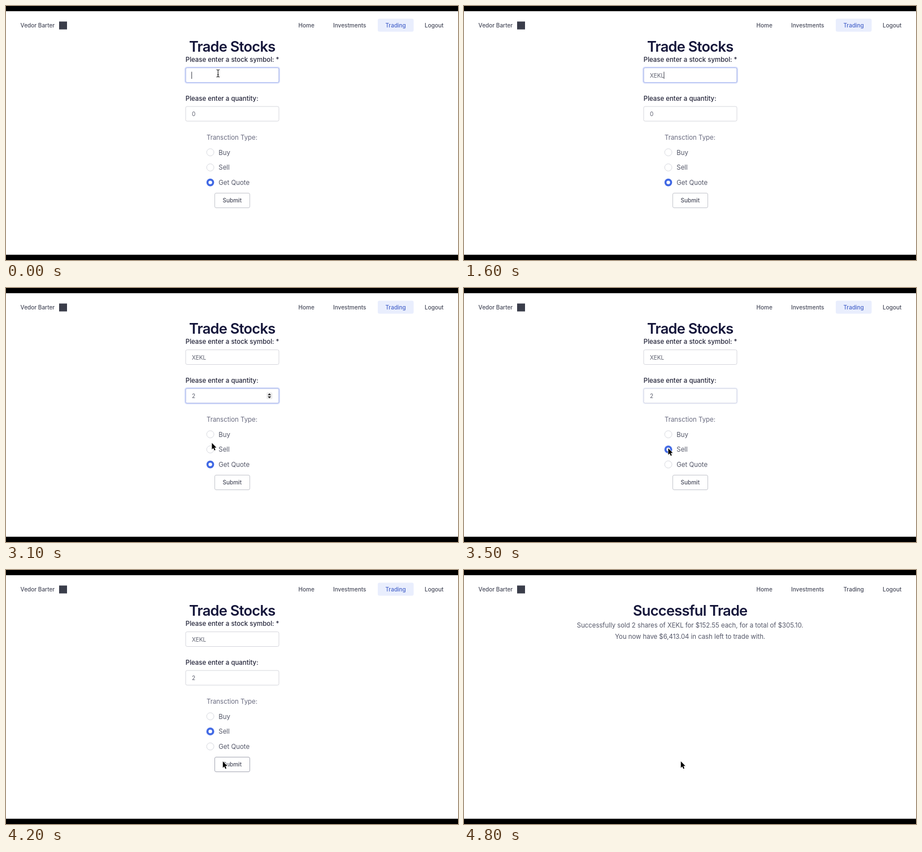
Recreate the animation shown at these times as an HTML page. Size 800 by 450 pixels, loop 5.03 s.

```html
<!DOCTYPE html>
<html lang="en">
<head>
<meta charset="utf-8">
<title>Stock trade form</title>
<style>
  html, body { margin: 0; width: 100%; height: 100%; overflow: hidden; background: #fff; }
  svg { display: block; width: 100vw; height: 100vh; }
  text { font: 400 11.45px Inter, "Open Sans", sans-serif; fill: #555869; white-space: pre; }
  .nav { font-size: 10.03px; font-weight: 500; fill: #494c5c; }
  .title { font-size: 25.5px; font-weight: 600; letter-spacing: -.03em; fill: #15163a; }
  .label { font-weight: 500; fill: #25263b; }
  .legend { fill: #6a6c80; }
  .value { font-size: 10.03px; fill: #5b5e6d; }
  .para { letter-spacing: -.005em; }
  .mid { text-anchor: middle; }
  .box { fill: #fff; stroke: #d6d7dd; }
  .ring { fill: none; stroke: #d9e0fb; stroke-width: 2; }
  .edge { fill: none; stroke: #a7b6ef; }
</style>
</head>
<body>
<svg viewBox="0 0 800 450" preserveAspectRatio="none">
  <rect width="800" height="450" fill="#fff"/>
  <rect id="pill" x="658" y="22.5" width="63.5" height="23" rx="3" fill="#e9eefd"/>
  <text class="nav" x="25.6" y="37.7">Vedor Barter</text>
  <rect x="94" y="27.5" width="14" height="14" fill="#3a3d4a"/>
  <text class="nav" x="517.6" y="37.7">Home</text>
  <text class="nav" x="579" y="37.7">Investments</text>
  <text class="nav" id="trading" x="671.4" y="37.7">Trading</text>
  <text class="nav" x="741.1" y="37.7">Logout</text>

  <g id="form">
    <text class="title mid" x="400.2" y="80.7">Trade Stocks</text>
    <text class="label" x="317.8" y="99.2">Please enter a stock symbol: *</text>
    <text class="label" x="317.8" y="167.5">Please enter a quantity:</text>
    <g id="fields"></g>
    <g id="stepper">
      <rect x="461" y="185" width="10.5" height="12" rx="2" fill="#ededee"/>
      <path d="M463.2 189.9h6l-3-3.3zM463.2 192.1h6l-3 3.3z" fill="#333"/>
    </g>
    <rect id="caret" width="1" height="12.5" fill="#3a3c48"/>
    <text class="legend" x="354.9" y="236.8">Transction Type:</text>
    <g id="radios"></g>
    <g id="submit">
      <rect id="button" class="box" x="369.5" y="331.5" width="62" height="26" rx="2.5"/>
      <text class="nav mid" x="400.3" y="347.6">Submit</text>
    </g>
    <g id="loading">
      <rect class="box" x="361.5" y="331.5" width="78" height="26" rx="2.5" style="stroke:#e7e8eb"/>
      <circle id="spin" cx="378.3" cy="344.2" r="5.5" fill="none" stroke="#bfc1c9" stroke-width="1.3" stroke-dasharray="26 8.6"/>
      <text class="nav mid" x="408.6" y="347.6" style="fill:#c2c4cc">Submit</text>
    </g>
  </g>

  <g id="done">
    <text class="title mid" x="400.2" y="80.7">Successful Trade</text>
    <text class="para mid" x="400.2" y="101.8">Successfully sold 2 shares of XEKL for $152.55 each, for a total of $305.10.</text>
    <text class="para mid" x="400.2" y="121.8">You now have $6,413.04 in cash left to trade with.</text>
  </g>

  <path id="beam" d="M-2.8-6.5Q0-6.5 0-5V5Q0 6.5-2.8 6.5M2.8-6.5Q0-6.5 0-5M0 5Q0 6.5 2.8 6.5M-1.5 2.5h3" fill="none" stroke="#222" stroke-width="1.1"/>
  <path id="arrow" d="M0 0V11.4L2.6 9 4.4 13.2 6.3 12.4 4.5 8.3H8Z" fill="#000" stroke="#fff" stroke-width="1.4" paint-order="stroke"/>
  <rect width="800" height="9.2"/>
  <rect y="440.7" width="800" height="9.3"/>
</svg>
<script>
const LOOP = 5030, STEP = 100, CLICK = 3400, SEND = 4500, DONE = 4800;
const $ = id => document.getElementById(id);
const show = (el, on) => { el.style.display = on ? '' : 'none'; };
const clamp = v => Math.max(0, Math.min(1, v));

function add(parent, tag, attrs, text = '') {
  const el = document.createElementNS('http://www.w3.org/2000/svg', tag);
  for (const key in attrs) el.setAttribute(key, attrs[key]);
  el.textContent = text;
  parent.append(el);
  return el;
}

function makeField(y) {
  const box = { x: 318, y, width: 165, height: 26, rx: 2.5 };
  add($('fields'), 'rect', { ...box, class: 'box' });
  const focus = add($('fields'), 'g', {});
  add(focus, 'rect', { x: 316.9, y: y - 1.1, width: 167.2, height: 28.2, rx: 3.5, class: 'ring' });
  add(focus, 'rect', { ...box, class: 'edge' });
  const value = add($('fields'), 'text', { x: 329, y: y + 17.3, class: 'value' });
  return { y, focus, value };
}

function makeRadio(name, y) {
  const halo = add($('radios'), 'circle', { cx: 361.6, cy: y, r: 7.6, fill: '#d5defb' });
  const dot = add($('radios'), 'circle', { cx: 361.6, cy: y, fill: '#fff' });
  add($('radios'), 'text', { x: 376.3, y: y + 4.4 }, name);
  return { y, halo, dot };
}

const symbol = makeField(109.5), quantity = makeField(178);
const radios = [['Buy', 259.2], ['Sell', 286], ['Get Quote', 312.6]].map(r => makeRadio(...r));

// Each row: start time, value
const symbolText = [[0, ''], [800, 'X'], [1100, 'XE'], [1300, 'XEK'], [1400, 'XEKL']];
const quantityText = [[0, '0'], [2200, '2']];
const focusOn = [[0, 'symbol'], [1900, 'quantity'], [CLICK, 'sell'], [SEND, '']];
const caretOn = [[0, 1], [400, 0], [800, 1], [1900, 0], [2200, 1], [2700, 0], [3200, 1], [CLICK, 0]];
const mouseOn = [[0, 1], [800, 0], [2600, 1]];
// Pointer path: time, x, y
const path = [
  [0, 375.3, 119.3], [2600, 375.3, 119.3], [3100, 364.4, 274.5], [3300, 361.5, 284],
  [3700, 361.5, 284], [3800, 352.6, 256.2], [4200, 383.8, 339], [LOOP, 383.8, 339]
];

const at = (rows, t) => rows.filter(r => r[0] <= t).pop()[1];

function pointer(t) {
  const i = path.findIndex((p, n) => n && t < p[0]);
  const [a, b] = [path[i - 1], path[i]];
  const k = (t - a[0]) / (b[0] - a[0]);
  const e = k * k * (3 - 2 * k);
  return [a[1] + (b[1] - a[1]) * e, a[2] + (b[2] - a[2]) * e];
}

// Focus rings cross-fade shortly after a change
function ringLevel(name, t) {
  const i = focusOn.findIndex(r => r[1] === name);
  const fade = from => clamp((t - from + 50) / 200);
  const rise = i ? (t < focusOn[i][0] ? 0 : fade(focusOn[i][0])) : 1;
  const end = focusOn[i + 1][0];
  return t < end ? rise : 1 - fade(end);
}

function drawRadio(radio, checked, hover) {
  const attrs = checked
    ? { r: 5, stroke: '#4068e4', 'stroke-width': 3.6 }
    : { r: 6.4, stroke: hover ? '#a6a8b4' : '#d8dae0', 'stroke-width': 1 };
  for (const key in attrs) radio.dot.setAttribute(key, attrs[key]);
}

function render(t) {
  const done = t >= DONE, sending = t >= SEND;
  show($('form'), !done);
  show($('done'), done);
  show($('pill'), !done);
  $('trading').style.fill = done ? '' : '#4a66cb';

  symbol.value.textContent = at(symbolText, t);
  quantity.value.textContent = at(quantityText, t);
  symbol.focus.style.opacity = ringLevel('symbol', t);
  quantity.focus.style.opacity = ringLevel('quantity', t);
  const focus = at(focusOn, t);
  show($('stepper'), focus === 'quantity');

  const field = focus === 'symbol' ? symbol : quantity;
  show($('caret'), at(caretOn, t));
  if (!done) {
    const text = field.value.textContent;
    $('caret').setAttribute('x', 328.2 + (text ? field.value.getComputedTextLength() : 0));
    $('caret').setAttribute('y', field.y + 7);
  }

  const [x, y] = pointer(t);
  const picked = t < CLICK ? 2 : 1;
  radios.forEach((r, i) => {
    const hover = t >= 2600 && Math.abs(y - r.y) < 7 && x > 352 && x < 432;
    drawRadio(r, i === picked, hover);
    r.halo.style.opacity = i === 1 ? ringLevel('sell', t) : 0;
  });

  show($('submit'), !sending);
  show($('loading'), sending);
  $('button').style.stroke = y > 331 ? '#a6a8b4' : '#c4c6cd';
  $('spin').setAttribute('transform', `rotate(${(t - SEND) * .36} 378.3 344.2)`);

  const typing = x > 318 && [symbol, quantity].some(f => y > f.y && y < f.y + 26);
  const mouse = at(mouseOn, t);
  show($('beam'), mouse && typing);
  show($('arrow'), mouse && !typing);
  for (const id of ['beam', 'arrow']) $(id).setAttribute('transform', `translate(${x} ${y})`);
}

const start = performance.now();
function tick() {
  const t = (performance.now() - start) % LOOP;
  render(Math.floor(t / STEP) * STEP);
  requestAnimationFrame(tick);
}
tick();
</script>
</body>
</html>
```
